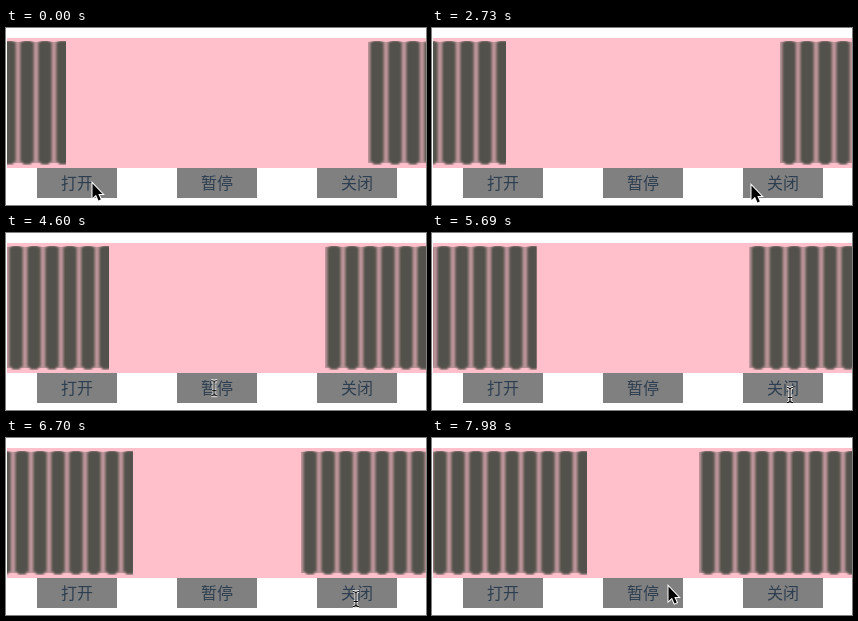
Write an HTML page that moves like this. It is 420x177 px and loops after 8000 ms.

```html
<!DOCTYPE html>
<html lang="zh-CN">
<head>
<meta charset="utf-8">
<title>Curtain</title>
<style>
html, body { margin: 0; width: 100%; height: 100%; overflow: hidden; background: #fff; }
svg { display: block; }
.label { font: 16px "Noto Sans CJK SC", "Noto Sans CJK", sans-serif; fill: #2c3e50; text-anchor: middle; }
.left, .right, .cursor, .arrow, .beam { animation: 8s linear infinite; }
.left { animation-name: left; }
.right { animation-name: right; }
.cursor { animation-name: move; }
.arrow { animation-name: arrow; animation-timing-function: step-end; }
.beam { animation-name: beam; animation-timing-function: step-end; }

@keyframes left {
  0%, 26.25% { transform: translateX(-151px); }
  50.5%, 70.1% { transform: translateX(-108px); }
  99.75%, 100% { transform: translateX(-56px); }
}
@keyframes right {
  0%, 26.25% { transform: translateX(361px); }
  50.5%, 70.1% { transform: translateX(318px); }
  99.75%, 100% { transform: translateX(266px); }
}
@keyframes move {
  0%, 5.6% { transform: translate(86px, 155px); }
  6.75% { transform: translate(85px, 155px); }
  14.6% { transform: translate(85px, 155px); animation-timing-function: ease-in; }
  18% { transform: translate(211px, 161px); animation-timing-function: ease-out; }
  21.75% { transform: translate(319px, 157px); }
  34.25% { transform: translate(319px, 157px); animation-timing-function: ease-in-out; }
  36.5% { transform: translate(206px, 155px); }
  57.2% { transform: translate(206px, 155px); animation-timing-function: ease-in-out; }
  60.9% { transform: translate(363px, 168px); }
  62.6% { transform: translate(363px, 168px); }
  63.75% { transform: translate(358px, 162px); }
  82.5% { transform: translate(358px, 162px); animation-timing-function: ease-in-out; }
  89.4%, 91.1% { transform: translate(238px, 147px); }
  92.5%, 100% { transform: translate(236px, 148px); }
}
/* The pointer becomes a text beam while it is over a label. */
@keyframes arrow {
  0%, 18.4%, 58.4%, 60.4%, 84.6%, 100% { opacity: 1; }
  17.6%, 35.8%, 59.6%, 63.2% { opacity: 0; }
}
@keyframes beam {
  0%, 18.4%, 58.4%, 60.4%, 84.6%, 100% { opacity: 0; }
  17.6%, 35.8%, 59.6%, 63.2% { opacity: 1; }
}
</style>
</head>
<body>
<svg width="420" height="177" viewBox="0 0 420 177">
  <defs>
    <filter id="soft" filterUnits="userSpaceOnUse" x="-4" y="-4" width="222" height="140">
      <feGaussianBlur stdDeviation="0.9"/>
    </filter>
    <clipPath id="cloth"><path d="M0 0H210V124H0z"/></clipPath>
    <clipPath id="window"><path d="M1 10H420V140H1z"/></clipPath>
    <g id="curtain" clip-path="url(#cloth)">
      <path d="M0 1H210V122H0z" fill="#54524d" opacity=".38"/>
      <g filter="url(#soft)" stroke="#52514c">
        <path d="M2.4 61H216" stroke-width="120" stroke-dasharray="13.2 4.8"/>
        <path d="M5 61.5H216" stroke-width="124" stroke-dasharray="8 10"/>
      </g>
    </g>
    <path id="bar" d="M-3-7.5Q0-7.5 0-5.5 0-7.5 3-7.5M0-5.5V5.5M-3 7.5Q0 7.5 0 5.5 0 7.5 3 7.5M-2 2.5H2"/>
  </defs>

  <path d="M1 10H420V140H1z" fill="pink"/>
  <g clip-path="url(#window)">
    <g transform="translate(1 13)">
      <g class="left"><use href="#curtain"/></g>
      <g class="right"><use href="#curtain"/></g>
    </g>
  </g>

  <path d="M31 140h80v30h-80zM171 140h80v30h-80zM311 140h80v30h-80z" fill="gray"/>
  <g class="label">
    <text x="71" y="161">打开</text>
    <text x="211" y="161">暂停</text>
    <text x="351" y="161">关闭</text>
  </g>

  <g class="cursor">
    <path class="arrow" d="M.5.5V15L4 11.8 6.5 17.5 8.8 16.5 6.3 11H10.5z" stroke="#fff" stroke-width="2" paint-order="stroke"/>
    <g class="beam" fill="none">
      <use href="#bar" stroke="#fff" stroke-width="3"/>
      <use href="#bar" stroke="#000" stroke-width="1.1"/>
    </g>
  </g>
</svg>
</body>
</html>
```
